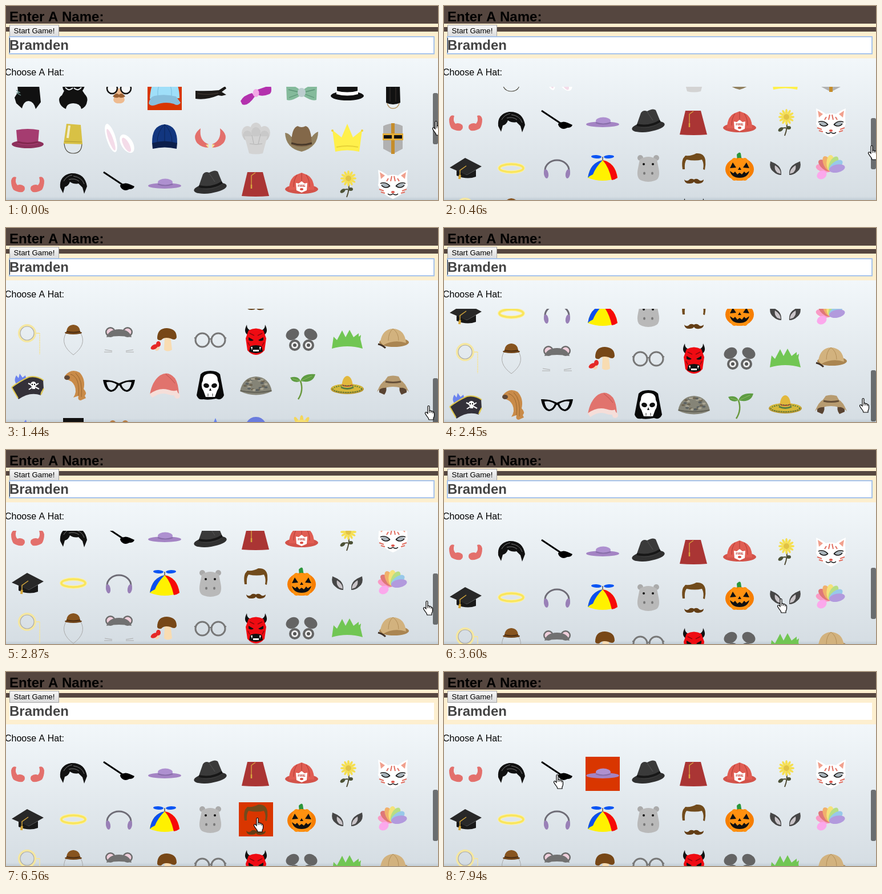
Write an HTML page with a canvas that moves like this. It is 757 px wide and 341 px high and loops after 7990 ms.

```html
<!DOCTYPE html>
<html lang="en">
<head>
<meta charset="utf-8">
<title>Choose a hat</title>
<style>
  html, body { margin: 0; width: 100%; height: 100%; overflow: hidden; }
  body { position: relative; background: #fdefcf; font-family: "Liberation Sans", Arial, sans-serif; font-kerning: none; }
  body > * { position: absolute; box-sizing: border-box; white-space: pre; }
  .bar { left: 0; width: 757px; background: #55463f; }
  #panel { left: 0; top: 92px; width: 757px; height: 249px;
    background: linear-gradient(transparent 243px, #b4c2cd99 249px), linear-gradient(#f2f7fa, #d5dde3); }
  h1 { margin: 0; left: 6px; top: 5px; font: bold 24px/28px "Liberation Sans", Arial, sans-serif; font-kerning: none; }
  #start { left: 6px; top: 33px; width: 87px; height: 21px; border: 1px solid #a5a5a5;
    background: linear-gradient(#f6f6f6, #dcdcdc); font-size: 13.33px; line-height: 19px; text-align: center; }
  #name { left: 6px; top: 54px; width: 744px; height: 30px; background: #fff; color: #444;
    font: bold 24px/30px "Liberation Sans", Arial, sans-serif; font-kerning: none; }
  #name.focus { box-shadow: 0 0 0 1px #a3c1ea, inset 0 0 0 1px #a9c5ec; }
  #caret { left: 6px; top: 56px; width: 1px; height: 26px; background: #222; }
  #label { left: -2px; top: 107px; font-size: 16px; line-height: 19px; }
  canvas { left: 0; top: 0; }
</style>
</head>
<body>
<div class="bar" style="top:0;height:31px"></div>
<div class="bar" style="top:37px;height:8px"></div>
<div id="panel"></div>
<h1>Enter A Name:</h1>
<div id="start">Start Game!</div>
<div id="name">Bramden</div>
<div id="caret"></div>
<div id="label">Choose A Hat:</div>
<canvas width="757" height="341"></canvas>
<script>
const LOOP = 7990, TOP = 142, PITCH = 80.25;
const g = document.querySelector('canvas').getContext('2d');
const nameBox = document.getElementById('name');
const caret = document.getElementById('caret');

const paths = {};
const path = d => paths[d] ||= new Path2D(d);
const fill = (c, d) => { g.fillStyle = c; g.fill(path(d), 'evenodd'); };
const line = (c, w, d) => { g.strokeStyle = c; g.lineWidth = w; g.stroke(path(d)); };
const arc = (x, y, rx, ry, rot) => { g.beginPath(); g.ellipse(x, y, rx, ry, rot, 0, 7); };
const oval = (c, x, y, rx, ry = rx, rot = 0) => { arc(x, y, rx, ry, rot); g.fillStyle = c; g.fill(); };
const ring = (c, w, x, y, rx, ry = rx) => { arc(x, y, rx, ry, 0); g.strokeStyle = c; g.lineWidth = w; g.stroke(); };
const twin = draw => {
  draw();
  g.save(); g.scale(-1, 1); draw(); g.restore();
};
const INK = '#111', GREY = '#6b6b6b', RED = '#e3706c';

const hats = [
  [ // hair, cat hood, disguise, light cap, bandana, bow, bow tie, boater, beard
    () => { fill(INK, 'M-18-14H20L23 16 14 28Q11 15 2 14-7 14-10 27L-20 18-23 8-17-2Z'); line('#6b8f8c', 1.3, 'M-20-5l6 4-5 1 7 4'); },
    () => { fill(INK, 'M-19-14Q-19-6-16-4L-20 4Q-27 8-24 17-22 24-13 28-12 18 0 18 12 18 14 28 23 24 24 15 26 8 20 2L16-4Q20-10 20-14Z');
      twin(() => line('#e8edf0', 2, 'M1-9Q8-2 14-10')); },
    () => { fill('#eebb90', 'M-4-8H4L10 12Q8 19 0 18-8 19-10 12Z'); fill('#9a6033', 'M-11 6Q-5-2 0 3 5-2 11 6 4 10 0 7-5 10-11 6Z');
      twin(() => { oval('#f4f7f8', 12, -8, 9, 9); ring(INK, 2.5, 12, -8, 9, 9); }); },
    () => { fill('#9fdff9', 'M-26 10Q-24-30 0-33 26-28 26 9Z'); line('#79bcdc', 1, 'M0-33Q-14-14-12 5M0-33Q14-14 12 5');
      fill('#88bfdc', 'M-28 18Q-26 7-18 5 0 1 20 6L28 17Q23 24 16 19 0 14-16 21-25 24-28 18Z'); },
    () => { fill('#1d1a18', 'M-26-4Q-4-3 15-5L26-12 28-8 20-2 28 3 20 5 14 4Q-8 13-26 10Z'); line('#4b4038', 1, 'M-22 1Q-2 4 14 0'); },
    () => { fill('#b331ad', 'M-27 14L-24 20Q-14 24-2 6L-7 0Q-22 4-27 14ZM0-5L26-14Q29 0 23 2 11 7 3 3Z'); oval('#f3a8e6', 0, 0, 5.5, 7); },
    () => { twin(() => { fill('#84ba9b', 'M3-6Q20-18 27-14L26 12Q18 15 3 5Z'); line('#5c9276', 1.3, 'M6-2L23-6M6 2L22 8'); }); oval('#bccdcf', 0, -1, 7, 8); },
    () => { oval(INK, 0, 5, 29, 8); fill(INK, 'M-18-20H18V4H-18Z'); fill('#fff', 'M-19-4Q0 1 19-4V2Q0 7-19 2Z'); },
    () => { line('#b99a6b', 1.5, 'M-10 18Q-8 27 0 27 9 27 11 18'); fill(INK, 'M-12-14H12L13 17Q0 23-12 17Z'); line('#3a3530', 1, 'M-5-10V15M5-10V15'); },
  ],
  [ // hat, bucket, bunny ears, cap, horns, chef, cowboy, crown, helm
    () => { oval('#8d315c', 0, 10, 28, 7); fill('#a53c70', 'M-20-15Q0-19 20-15L18 9Q0 14-18 9Z'); line('#82284f', 3, 'M-18 6Q0 11 18 6'); },
    () => { line('#4d4a40', 1.2, 'M-16 8Q-15 26 0 26 15 26 15 8'); fill('#d8c145', 'M-12-26L13-24 16 10-17 9Z'); line('#f1eccb', 4, 'M-7-23L-10-1'); line('#ad9830', 1, 'M-16 5L15 6'); },
    () => { oval('#fff', -14, -1, 8, 26, -.3); oval('#f4dce9', -14, 2, 4, 20, -.35); oval('#fff', 14, 9, 10, 18, -.55); oval('#f4dce9', 13, 11, 5, 14, -.5); },
    () => { fill('#12367f', 'M-22 9Q-23-23 0-25 23-23 22 9Z'); line('#0a2459', 1, 'M0-25V6M0-25Q-13-12-13 7M0-25Q13-12 13 7');
      fill('#0b1e4b', 'M-22 8Q0 1 22 8L21 18Q0 13-21 18Z'); },
    () => twin(() => { fill(RED, 'M17-18Q33-6 23 8 15 16 3 16V10Q20 4 17-18Z'); fill('#f4e39b', 'M8 11L3 17V10Z'); }),
    () => { ['#d3d3d3', '#c9c9c9'].forEach((c, i) => [-15, 0, 15].forEach(x => oval(c, x, (x ? -10 : -16) + i * 5, 10 - i * 2, 12 - i * 3)));
      fill('#d3d3d3', 'M-20-4H20L12 26Q0 29-12 26Z'); line('#b3b3b3', 1, 'M-11 9Q0 12 11 9M-7-6L-4 9M8-8L4 10'); },
    () => { fill('#91805f', 'M-29-10Q-23-10-18-3H18Q23-10 29-12 29 15 0 23-28 17-29-10Z'); fill('#836849', 'M-18 11Q-18-19-7-22 0-18 7-22 17-20 18 11 0 18-18 11Z');
      line('#493a2b', 3, 'M-18 8Q0 14 18 8'); },
    () => { fill('#fff04b', 'M-21 23L-26-15-10-2 0-26 10-2 26-15 21 23Q0 18-21 23Z'); twin(() => oval('#f2d340', 26, -14, 2)); line('#e6d237', 2, 'M-19 15Q0 11 19 15'); },
    () => { fill('#b1b1b1', 'M-17-22Q0-31 17-22V18L0 27-17 18Z'); fill('#c58d2b', 'M-3-27H3V27H-3Z'); fill('#e4ad38', 'M-18-9H18V3H-18Z'); fill(INK, 'M-16-6H-2V0H-16ZM2-6H16V0H2Z'); },
  ],
  [ // curled horns, hair, patch, sun hat, fedora, fez, fire helmet, flower, fox mask
    () => twin(() => fill(RED, 'M20-12Q27-15 29-6 29 4 25 10 18 15 9 14 3 10 6 4 12-1 18 2 23-3 20-12Z')),
    () => { fill(INK, 'M-18 16L-23 6Q-25-15-4-19 20-20 24 4L19 17 16 6 9-1Q1 1-6-4-8 3-15 5Z'); line('#777', 1, 'M-17-5Q-12-14-2-16M0-14Q15-12 19 0M-8-8Q2-11 10-5'); },
    () => { line('#000', 3, 'M-27-21L6 1'); fill('#000', 'M2 2Q10-4 18 0L27 4Q26 9 18 9 11 13 6 9 2 6 2 2Z'); },
    () => { oval('#a484c4', 0, 3, 29, 5); oval('#ae90d0', 1, -3, 13, 6.5); line('#876da8', 2, 'M-12 0Q1 5 14 0'); },
    () => { oval('#303030', 0, 7, 29, 9, -.15); fill('#3a3a3a', 'M-21 6L-13-17Q-9-23-2-20 8-26 13-22L22 0Q0 15-21 6Z'); line('#171717', 4, 'M-20 4Q2 9 21-3'); line('#555', 1, 'M-2-19L8-4'); },
    () => { fill('#aa3534', 'M-15-21H12L23 21Q0 23-25 21Z'); line('#d8a83e', 1.3, 'M-1-20L-8-15V3'); line('#d8a83e', 2.5, 'M-8 1V8'); },
    () => { oval('#d3534a', 0, 9, 29, 8); fill('#e05d53', 'M-22 10Q-22-13-5-18L0-20 5-18Q22-13 22 10Z'); line('#b8413a', 1.2, 'M0-19V-3M-8-16Q-14-8-14 5M8-16Q14-8 14 5');
      fill('#fff', 'M-10-2L-5-1 0-5 5-1 10-2 9 11 0 15-9 11Z'); g.fillStyle = '#c43b33'; g.font = 'bold 6px "Liberation Sans", sans-serif'; g.textAlign = 'center'; g.fillText('FIRE', 0, 5); oval('#d94f42', 0, 9, 3, 2); },
    () => { line('#514d36', 2, 'M2-8Q5 8-1 23M1 9L-8 10M1 11L9 8'); oval('#4c5136', -8, 12, 5, 3, -.6); oval('#4c5136', 6, 9, 4, 3);
      for (let i = 0; i < 12; i++) { const a = i * Math.PI / 6; oval('#f5df52', 2 + 9 * Math.cos(a), -10 + 9 * Math.sin(a), 5, 2, a); } oval('#e2c344', 2, -10, 5); },
    () => { fill('#fff', 'M-26-25Q-14-20-9-15 0-18 9-15 14-20 26-25 24-10 26 2 20 18 0 26-20 18-26 2-24-10-26-25Z');
      twin(() => { fill('#f1a08d', 'M14-15L23-21 21-9Z'); fill('#a9b4ba', 'M5 3Q13-5 21 1 15 9 5 3Z'); line(INK, 1.5, 'M5 4Q12-5 22-1M6 4Q14 9 20 2'); line('#e06f61', 2, 'M2-14L4-5M8-10L11-5M24 9L16 12M21 14L14 16'); line(INK, 1.3, 'M0 17Q5 21 9 17'); }); oval('#dd5a50', 0, 14, 3, 2); },
  ],
  [ // graduate, halo, headphones, propeller, hippo, hair, pumpkin, wolf ears, rainbow
    () => { fill('#191919', 'M-16 3L2 12 18 3V15Q2 21-16 13Z'); fill('#282828', 'M-28-1L-1-18 28-3 2 12Z'); line('#d6a83c', 1.5, 'M1-4L-10 4V15'); line('#d6a83c', 4, 'M-10 12L-11 19'); },
    () => { ring('#fcf1a6', 6, 0, 0, 21, 7); ring('#f9e55c', 3.5, 0, 0, 21, 7); },
    () => { line('#6e6c76', 3, 'M-21 9V4A21 18 0 0 1 21 4V9'); twin(() => oval('#9980b7', 19, 10, 4, 8, .15)); },
    () => { oval('#0b55f4', -11, -20, 9, 3, .05); oval('#0b55f4', 11, -20, 9, 3, -.05); line('#777', 2, 'M0-20V-11'); fill('#fff100', 'M-26 17Q-22-10 0-14 22-10 26 17 0 27-26 17Z');
      fill('#0b4ff0', 'M-26 17Q-22-10 0-14-12-2-17 11-22 13-26 17Z'); fill('#f60a0a', 'M26 17Q22-10 0-14 11-2 16 21 22 20 26 17Z'); },
    () => { twin(() => oval('#aaa', 14, -18, 5)); fill('#b9b9b9', 'M-15-15Q0-25 15-15L18 0Q22 19 11 22 0 26-11 22-22 19-18 0Z'); twin(() => { oval(INK, 8, -7, 2); oval('#777', 7, 9, 2, 2.5); }); },
    () => { fill('#714b1c', 'M-20 2Q-22-10-19-17L-15-22Q-4-21 4-26 18-27 20-14 21-6 19 3L16 2Q18-8 14-15 2-12-13-15-17-10-16 2Z'); fill('#633e16', 'M0 20Q-6 17-9 21-13 24-17 20-16 28-7 27-2 27 0 24 3 28 9 27 17 26 17 20 12 24 9 21 5 17 0 20Z'); },
    () => { fill('#2c963c', 'M-4-13L-5-24Q0-30 2-26L4-13Z'); oval('#f77e00', 0, 2, 25, 20); twin(() => oval('#ff9110', 9, 2, 9, 20)); oval('#ff9110', 0, 2, 9, 20);
      twin(() => fill(INK, 'M6-1L12-10 17 0Z')); fill(INK, 'M0-2L-3 3H3ZM-17 5L-11 9-8 6-4 11 0 8 4 11 8 6 11 9 17 5Q14 17 0 17-14 17-17 5Z'); },
    () => twin(() => { fill('#464646', 'M26-12Q29 0 21 6 15 12 7 12 6 2 12-4 18-9 26-12Z'); fill('#c9c4c8', 'M18-5Q20 2 14 8L8 10Q8 1 18-5Z'); }),
    () => { ['#f99bc6', '#df7777', '#f1b06c', '#f4e27a', '#b6de86', '#98c9e9', '#b29add'].forEach((c, i) => {
        const a = -2.9 + i * .45; oval(c, -1 + 12 * Math.cos(a), 3 + 12 * Math.sin(a), 14, 7, a); });
      oval('#fba8ec', -16, 12, 9, 7, -.5); },
  ],
  [ // monocle, bowler, mouse, mushroom, glasses, oni, panda, grass, pith helmet
    () => { ring('#f5e7a0', 4, -1, -12, 14); ring('#aaa', 1.2, -1, -12, 12); line('#f3e5a2', 2, 'M14-12H21'); g.setLineDash([2, 1]); line('#f3e5a2', 2, 'M21-12V25'); g.setLineDash([]); },
    () => { line('#a9a9a9', 1, 'M-13-12Q-24 8 0 26 24 8 13-12'); oval('#6b4119', 0, -13, 15, 3); fill('#87541f', 'M-12-13Q-12-26 0-27 12-26 12-13 0-10-12-13Z'); line('#4c2d12', 2, 'M-12-15Q0-12 12-15'); },
    () => { twin(() => { oval(GREY, 15, -14, 9); oval('#efcfdb', 15, -14, 6.5); line('#aaa', 1, 'M12 19L25 17M12 21L26 21'); }); fill('#717171', 'M-22-5Q-18-19 0-19 18-19 22-5 0-9-22-5Z'); },
    () => { fill('#f8dcb2', 'M0-8H10L13 17Q5 22-1 17Z'); fill('#774717', 'M-13-3Q-13-21 4-21 21-20 21-5 19 2 10-3-1-6-6 0-12 1-13-3Z'); oval('#f5d5b2', -13, 14, 4, 5, .5); oval('#e52927', -18, 12, 7, 4, -.5); oval('#e52927', -11, 7, 4, 5); },
    () => twin(() => { ring('#777', 3, 14, 0, 12); line('#777', 2, 'M0-2H3M25-3L28-4'); }),
    () => { twin(() => fill(INK, 'M9-17Q16-19 16-27 23-14 14-9Z')); fill('#ef0b12', 'M-13-17Q0-24 13-17L18-3 15 18Q8 26 0 26-8 26-15 18L-18-3Z');
      twin(() => { fill(INK, 'M4 0L13-5 13 0Q8 3 4 0Z'); line('#8c090d', 1.5, 'M3-8L11-12M14 4L11 10'); }); fill(INK, 'M-10 11Q0 7 10 11L12 20Q0 26-12 20Z'); fill('#fff', 'M-9 12H-6L-7 18ZM9 12H6L7 18ZM-5 17H5V20H-5Z'); },
    () => twin(() => { oval('#646464', 16, -10, 12, 9.5, .5); oval('#646464', 12, 9, 10); oval('#eee', 12, 9, 6); oval('#555', 12, 9, 3); }),
    () => fill('#71c653', 'M-27 15L-24-6-18 0-9-17-3-5 4-18 11-5 20-12 20-6 24-9 23-2 27 15Q0 7-27 15Z'),
    () => { oval('#aa8551', 2, 4, 26, 8); fill('#d2b27e', 'M-22 3Q-19-19 0-20 21-19 23 5 2-2-17 9Z'); line('#b28e59', 1, 'M0-20Q-8-13-8 1M0-20Q10-13 10 1'); line('#3f3025', 3, 'M-26 7Q-18 9-13 14'); },
  ],
  [ // pirate, wig, cat eyes, santa, skull, camo, sprout, sombrero, ranger
    () => { fill('#6b83ee', 'M-14 1Q-27-5-20-18L-16-13-14-21-9-14-4-18Q0-5-5 3Z'); fill('#343139', 'M-28 3Q-14-8 2-15 16-18 27-10L28 6Q22 10 23 17 4 10-16 24-22 14-28 3Z'); line('#dfc84d', 2, 'M-28 3Q-14-8 2-15 16-18 28-9M28 5L23 16M-28 3L-17 22');
      oval('#fff', 10, -2, 5); fill('#fff', 'M8 1H13V6H8Z'); line('#fff', 2, 'M1-4L20 6M2 7L19-4'); oval(INK, 8, -2, 1.2); oval(INK, 12, -2, 1.2); },
    () => { fill('#c98b49', 'M-15-17Q-4-31 11-23 22-11 18 6 25 13 20 18L22 22 13 26Q7 26 9 18L0 21Q7 11 2 0-2-9-15-12Z'); oval('#604836', -11, -14, 5, 4); line('#9a662e', 1, 'M-5-20Q12-15 9 18M4-22Q17-10 14 20'); },
    () => twin(() => fill('#050505', 'M0-4Q13-11 28-10 25 9 14 11 5 10 1 0H0ZM22-6Q20 6 14 8 7 7 4-2 13-8 22-6Z')),
    () => { fill('#e1736d', 'M-26 16Q-22-8-8-18 6-27 18-13 24-4 25 15 0 4-26 16Z'); line('#f5ded9', 8, 'M-24 18Q-9 7 5 11 16 15 23 12'); oval('#f5ded9', 22, 18, 5); line('#ba514d', 1, 'M2-20Q12-12 18-4'); },
    () => { fill('#090909', 'M-17-20Q-12-26 0-26 12-26 17-20L24 17Q20 27 10 23-4 26-12 24-21 26-24 17Z'); fill('#fff', 'M-13-9Q-13-21 0-21 13-21 13-9 18 0 12 9L8 20H-8L-12 9Q-18 0-13-9Z'); twin(() => { oval(INK, 7, 0, 5, 4, -.3); line('#333', 1, 'M4 14V19'); }); fill(INK, 'M0 4L-2 9H2Z'); },
    () => { fill('#858477', 'M-28 10Q-23-15 0-16 23-15 28 10 0 23-28 10Z');
      for (let i = 0; i < 26; i++) oval(['#5b6060', '#aaa593', '#6d6553'][i % 3], Math.sin(i * 2.4) * (8 + i * .5), -2 + Math.cos(i * 2.4) * 10, 3, 1.8);
      line('#59584e', 1.5, 'M-27 9Q0 15 27 9'); },
    () => { line('#69983d', 2.5, 'M-6 24Q4 9-2-8'); fill('#5e9c43', 'M-2-8Q-10-4-17-9L-20-14Q-6-18-2-8ZM-2-8Q2-22 24-20 20-3-2-8Z'); line('#8dbc5f', 1, 'M-16-12L-2-8 18-17'); },
    () => { oval('#b79730', 0, 6, 29, 9); oval('#d5b83a', 0, 4, 27, 7); fill('#e2b83d', 'M-10 4Q-9-16 0-17 9-16 10 4 0 9-10 4Z'); line('#547c45', 3, 'M-11 3Q0 8 11 3'); line('#bd4434', 2, 'M-9-1Q0 3 9-1'); g.setLineDash([2, 2]); ring('#587838', 2, 0, 6, 25, 6); g.setLineDash([]); },
    () => { twin(() => fill('#594331', 'M13-2Q25-1 24 12L15 16Q9 8 13-2Z')); fill('#b79b70', 'M-28 11Q-21-6-14-9L-9-16Q0-19 10-16L14-9Q21-6 28 11 19 2 14 4 0 0-14 4-21 3-28 11Z'); line('#665039', 3, 'M-13-7Q0-4 14-7'); },
  ],
  [
    () => fill('#7085ee', 'M-7 8Q-12-12-3-20L0-10 6-18 9 8Z'),
    () => { fill(INK, 'M-18-23H18V15H-18Z'); oval(INK, 0, 15, 27, 6); },
    () => twin(() => oval('#b47b43', 11, -10, 7, 9)),
    () => oval('#e7cf7a', 0, 5, 24, 8),
    () => { fill('#6682ee', 'M-7 2L-3-14 3-8 9-23 14-10 10 4Z'); oval('#3b3940', 0, 10, 26, 9); },
    () => fill('#6a7cdd', 'M-23 10Q-20-25 0-25 20-25 23 10Z'),
    () => { for (let i = 0; i < 12; i++) oval('#f3d65c', 18 * Math.cos(i * .524), 18 * Math.sin(i * .524) - 3, 7, 3, i * .524); oval('#f6df70', 0, -3, 17); },
    () => oval('#6c9c4d', 0, 10, 22, 8),
    () => oval('#9a7955', 0, 10, 24, 8),
  ],
];

// [time, value...] keys
const scrollKeys = [[0, 27], [50, 30], [430, 129], [870, 226.5], [1440, 304], [1680, 320], [2030, 303], [2210, 303], [2450, 270.75], [2980, 165], [3060, 161.5]];
const handKeys = [[0, 747, 203], [870, 740, 281], [1440, 734, 312], [2030, 730, 312], [2450, 728, 299], [3060, 733, 255.5], [3340, 733, 255.5],
  [3600, 584, 261], [4160, 345, 272], [4600, 110, 272], [4980, 335, 266], [5410, 474, 253], [5600, 517, 262], [5820, 448, 260],
  [5920, 440, 259], [6560, 434, 256], [6770, 434, 256], [7430, 268, 183], [7560, 268, 183], [7940, 192, 180]];

function at(keys, t, n = 1) {
  const i = keys.findIndex(k => k[0] > t);
  if (i < 0) return keys.at(-1)[n];
  const a = keys[i - 1], b = keys[i];
  return a[n] + (b[n] - a[n]) * (t - a[0]) / (b[0] - a[0]);
}

function drawHand(x, y) {
  g.save();
  g.translate(Math.round(x), Math.round(y));
  const d = 'M5 2Q5 .5 6.5 .5T8 2V9Q10 8 11 10 13 9 14 11 16.5 11 16.5 14V18Q16 21 15 22V25H7L6 22Q2 17 .5 14 .5 11 3 12L5 14Z';
  fill('#fff', d);
  line('#000', 1.2, d);
  line('#000', 1, 'M8 9V13M11 10V13M14 11V14');
  g.restore();
}

function draw(t) {
  const scroll = at(scrollKeys, t);
  const thumb = 153 + (scroll - 27) / 2.5;
  const [pickRow, pickCol] = t < 5920 ? [0, 3] : t < 7580 ? [3, 5] : [2, 3];

  g.clearRect(0, 0, 757, 341);
  g.save();
  g.beginPath();
  g.rect(0, TOP, 757, 341 - TOP);
  g.clip();
  hats.forEach((row, r) => {
    const y = 180 + r * PITCH - scroll;
    if (y < TOP - 32 || y > 373) return;
    row.forEach((hat, c) => {
      g.save();
      g.translate(38 + c * 80, Math.round(y));
      if (r === pickRow && c === pickCol) fill('#d93600', 'M-30-30H30V30H-30Z');
      hat();
      g.restore();
    });
  });
  g.fillStyle = 'rgba(0,0,0,.52)';
  g.beginPath();
  g.roundRect(748, Math.round(thumb), 9, 90, 3);
  g.fill();
  g.restore();

  drawHand(at(handKeys, t), t < 3060 ? thumb + 48.5 : at(handKeys, t, 2));

  const focused = t < 5920;
  nameBox.classList.toggle('focus', focused);
  const lit = t < 3420 || Math.floor((t - 3420) / 500) % 2 === 1;
  caret.style.visibility = focused && lit ? 'visible' : 'hidden';
}

const began = performance.now();
function tick() {
  draw((performance.now() - began) % LOOP);
  requestAnimationFrame(tick);
}
tick();
</script>
</body>
</html>
```
